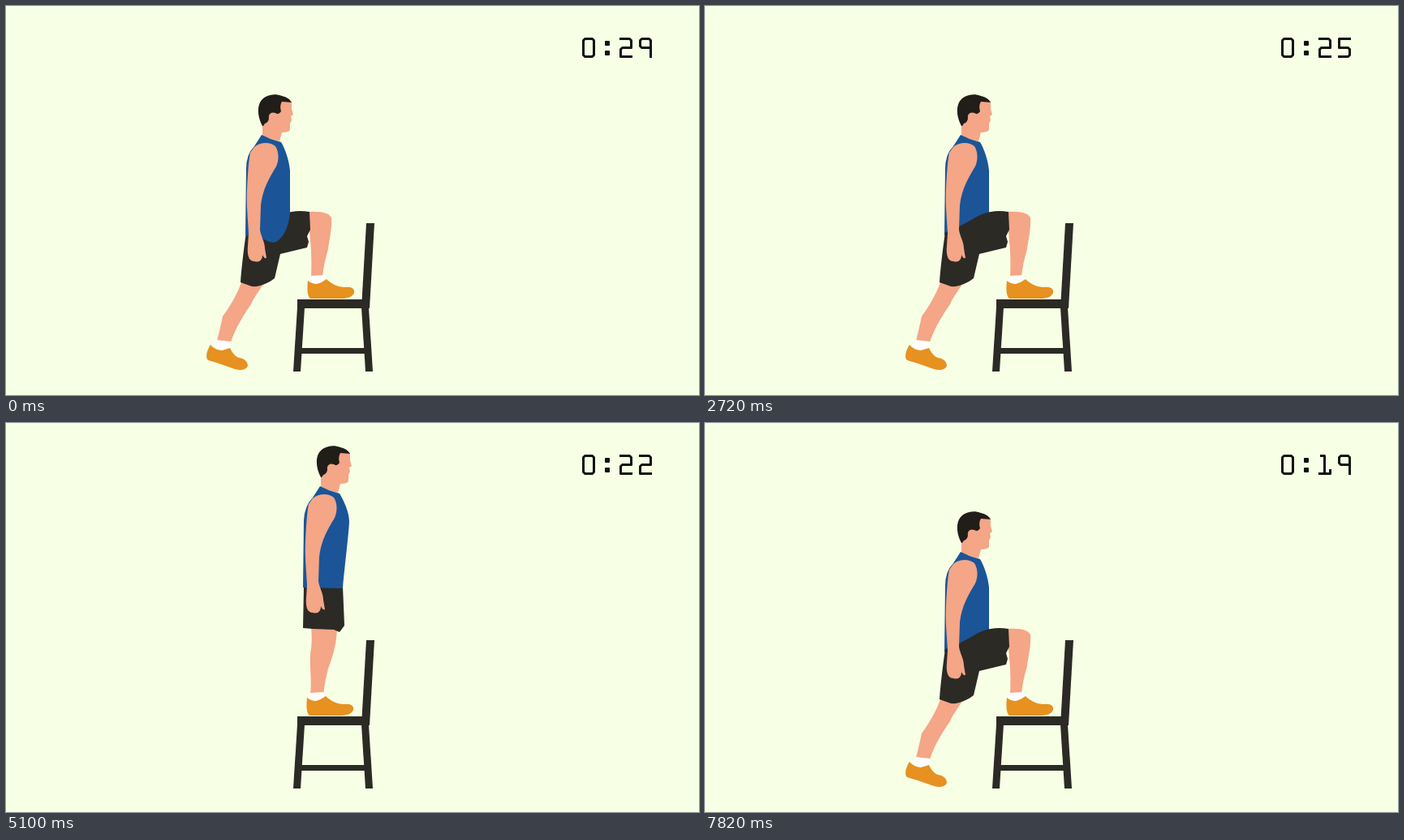
Recreate the animation shown at these times as an HTML page. Size 854x480 px, loop 7990 ms.

```html
<!DOCTYPE html>
<html lang="en">
<head>
<meta charset="utf-8">
<title>Chair step-up</title>
<style>
  html, body { margin: 0; width: 100%; height: 100%; overflow: hidden; background: #f7ffe5; }
  svg { display: block; width: 100vw; height: 100vh; }
  .skin { fill: #f4a687; }
  .hair { fill: #211d19; }
  .shirt { fill: #1b5597; }
  .dark { fill: #2b2a25; }
  .shoe { fill: #e69120; }
  .sock { fill: #fff; }
  #clock path { fill: none; stroke: #11110f; stroke-width: 3; stroke-linejoin: round; stroke-linecap: square; }
  #clock rect { fill: #11110f; }
  .pose { display: none; }
  .pose.on { display: inline; }
</style>
</head>
<body>
<svg viewBox="0 0 854 480">
  <defs>
    <g id="head">
      <path class="skin" d="M394 50 L411 36 L424 37 L424 46 L426 53 L423 55 L424 60 L422 64 L422 72 Q420 75 412 75 L409 86 L388 80 L388 64Z"/>
      <path class="hair" d="M388 67C383 58 381 46 385 38C390 29 402 26 412 30Q421 32 424 38L412 37Q409 42 411 49Q408 54 404 51C399 49 395 52 396 58Q395 63 391 64L389 67Z"/>
    </g>
    <path id="arm" class="skin" d="M378 93C385 87 397 86 404 92C408 98 409 108 405 117C397 130 388 145 386 165L385 195C386 203 391 210 391 218L393 230Q390 231 388 226C388 232 385 236 378 234C371 234 369 226 370 215L371 200C370 180 368 165 369 145C370 125 371 110 373 100Z"/>
    <g id="foot">
      <path class="sock" d="M374 333L391 332L395 340L382 345L372 341Z"/>
      <path class="shoe" d="M371 339Q376 343 382 343Q389 341 394 337C400 343 408 347 417 347C425 346 429 349 428 354C426 359 420 361 412 361L374 361C370 358 370 348 371 339Z"/>
    </g>
    <g id="stand">
      <path class="skin" d="M376 252L408 255C407 275 402 290 397 303Q393 318 391 335L375 334C377 320 374 300 375 285Q378 270 376 252Z"/>
      <use href="#foot"/>
      <path class="dark" d="M367 202L415 202L416 225L417 250L411 258L404 255L378 254L366 253Z"/>
      <use href="#head"/>
      <path class="shirt" d="M387 78L398 83L411 87C416 95 423 110 423 122C422 140 417 180 415 204L366 203L367 120Q368 102 378 92Z"/>
      <use href="#arm"/>
    </g>
    <g id="legs">
      <path class="skin" d="M290 341L319 340C312 352 305 360 302 368C290 385 282 400 277 415L260 413C263 402 265 392 267 383C275 372 284 358 290 341Z"/>
      <path class="sock" d="M259 412L277 414L276 425L266 426L255 419Z"/>
      <path class="shoe" d="M252 418Q258 425 266 425L276 422C279 428 282 432 287 434C294 435 298 439 298 444C296 449 290 450 282 448L262 441L249 437C245 433 248 424 252 418Z"/>
      <path class="skin" d="M372 254C385 253 397 254 401 261C402 275 398 290 397 300Q391 320 390 335L376 334C377 315 376 300 375 290Z"/>
      <use href="#foot" x="1" transform="translate(0 0)"/>
    </g>
    <path id="shorts" class="dark" d="M296 279L313 272C325 267 337 256 352 254Q362 252 374 254L375 276L371 284L373 291L371 298L338 306L331 336C323 342 313 347 303 346L289 341C290 325 293 300 296 279Z"/>
    <path id="lean" class="shirt" d="M387 78L398 83L411 87C416 95 421 110 422 122L422 174C420 195 412 208 402 211Q394 210 385 204L367 202L368 120Q368 102 378 92Z"/>
  </defs>

  <g class="dark">
    <path d="M444 268H454L448 373H438Z"/>
    <path d="M359 362H447V373H359Z"/>
    <path d="M359 372H368L363 451H354Z"/>
    <path d="M438 372H447L452 451H443Z"/>
    <path d="M363 422H443V429H363Z"/>
  </g>

  <g class="pose" id="floor"><use href="#stand" transform="translate(-85 89)"/></g>
  <g class="pose" id="top"><use href="#stand"/></g>
  <g class="pose" id="up">
    <use href="#legs"/>
    <use href="#shorts"/>
    <g transform="translate(-72 81)"><use href="#head"/><use href="#lean"/><use href="#arm"/></g>
  </g>
  <g class="pose" id="down">
    <use href="#legs"/>
    <g transform="translate(-72 81)"><use href="#head"/><use href="#lean"/></g>
    <use href="#shorts"/>
    <use href="#arm" transform="translate(-72 81)"/>
  </g>

  <g id="clock" role="timer">
    <path id="mins" transform="translate(711.5 40.5)"/>
    <rect x="738" y="43" width="6" height="6" rx="1"/>
    <rect x="738" y="55" width="6" height="6" rx="1"/>
    <path id="tens" transform="translate(757.5 40.5)"/>
    <path id="ones" transform="translate(781.5 40.5)"/>
  </g>
</svg>
<script>
  const LOOP = 7990, STEP = 170, TICK = 833, FIRST = 78;
  const $ = id => document.getElementById(id);

  const glyphs = [
    'M2 0H11L13 2V20L11 22H2L0 20V2Z',
    'M2 0H6V22M0 22H13V18',
    'M0 0H11L13 2V11H2L0 13V22H13',
    'M0 0H11L13 2V20L11 22H0M3 11H13',
    'M0 0V11H13M13 0V22',
    'M13 0H0V11H11L13 13V20L11 22H0',
    'M0 0V20L2 22H11L13 20V11H0',
    'M0 0H13V22',
    'M0 0H13V22H0ZM0 11H13',
    'M13 11H2L0 9V2L2 0H11L13 2V22'
  ];

  const cues = [
    [0, 'up'], [170, 'top'], [1020, 'down'], [1190, 'floor'],
    [1700, 'up'], [1870, 'top'], [2550, 'down'], [2890, 'floor'],
    [3400, 'top'], [4250, 'down'], [4590, 'floor'],
    [5100, 'top'], [5950, 'down'], [6120, 'floor'],
    [6800, 'top'], [7650, 'down']
  ];

  const start = performance.now();
  let shown = -1;

  function draw(t) {
    const pose = cues.filter(c => c[0] <= t).pop()[1];
    for (const el of document.querySelectorAll('.pose')) el.classList.toggle('on', el.id === pose);

    const left = 28 - Math.floor((t - FIRST) / TICK);
    $('mins').setAttribute('d', glyphs[0]);
    $('tens').setAttribute('d', glyphs[Math.floor(left / 10)]);
    $('ones').setAttribute('d', glyphs[left % 10]);
    $('clock').setAttribute('aria-label', '0:' + left);
  }

  function frame(now) {
    const t = Math.floor(Math.max(0, now - start) % LOOP / STEP) * STEP;
    if (t !== shown) draw(shown = t);
    requestAnimationFrame(frame);
  }
  frame(start);
</script>
</body>
</html>
```
